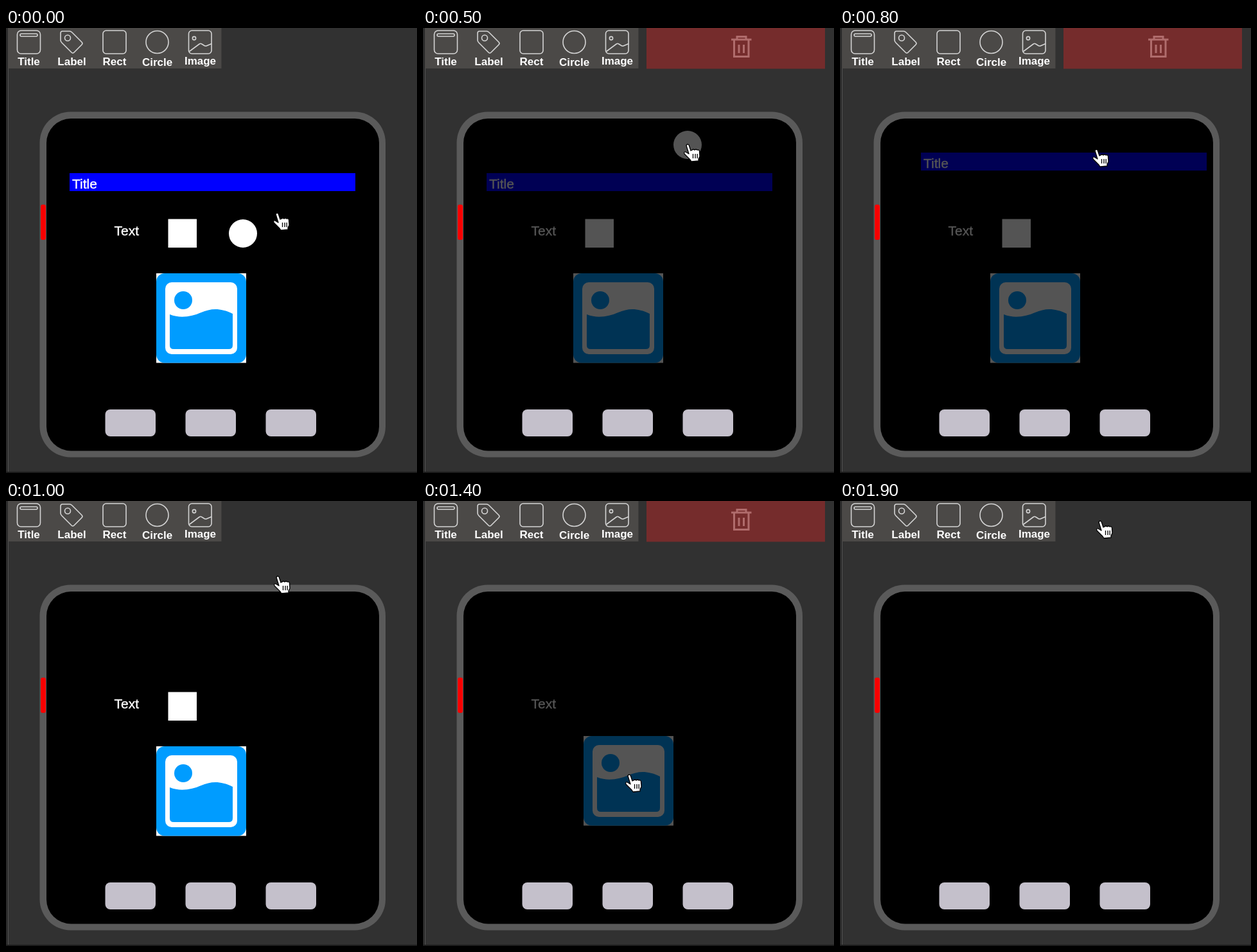
Write an HTML page that moves like this. It is 640 px wide and 693 px high and loops after 2000 ms.

```html
<!DOCTYPE html>
<html lang="en">
<head>
<meta charset="utf-8">
<title>Drag to delete</title>
<style>
html, body { margin: 0; width: 100%; height: 100%; overflow: hidden; background: #313131; }
svg { display: block; width: 100%; height: 100%; }
text { font-family: "Liberation Sans", Arial, sans-serif; fill: #fff; }
.icons { fill: none; stroke: #d4d4d4; stroke-width: 1.6; stroke-linejoin: round; }
.labels { font-size: 17px; font-weight: bold; text-anchor: middle; }
.field { font-size: 21px; stroke: #fff; stroke-width: .4; }

/* Every track holds its pose; 5% is one 100 ms step. */
.track { animation: 2s step-end infinite; }
#items { animation-name: dim; }
#trash { animation-name: bin; }
#circle { animation-name: dragCircle; }
#title { animation-name: dragTitle; }
#square { animation-name: dragSquare; }
#image { animation-name: dragImage; }
#label { animation-name: dragLabel; }
#cursor { animation-name: point; }
#hand { animation-name: hand; }
#arrow { animation-name: arrow; }

@keyframes dim {
  0%, 35%, 50%, 65%, 80%, 95%, 100% { opacity: 1; }
  25%, 40%, 60%, 70%, 90% { opacity: .33; }
}
@keyframes bin {
  0%, 35%, 50%, 65%, 80%, 95%, 100% { visibility: hidden; }
  25%, 40%, 60%, 70%, 90% { visibility: visible; }
}
@keyframes dragCircle {
  0% { transform: none; visibility: visible; }
  25% { transform: translate(43px, -138px); }
  30% { transform: translate(84px, -278px); }
  35%, 100% { visibility: hidden; }
}
@keyframes dragTitle {
  0% { transform: none; visibility: visible; }
  40% { transform: translate(27px, -32px); }
  45% { transform: translate(115px, -209px); }
  50%, 100% { visibility: hidden; }
}
@keyframes dragSquare {
  0% { transform: none; visibility: visible; }
  60% { transform: translate(203px, -296px); }
  65%, 100% { visibility: hidden; }
}
@keyframes dragImage {
  0% { transform: none; visibility: visible; }
  70% { transform: translate(16px, -16px); }
  75% { transform: translate(165px, -423px); }
  80%, 100% { visibility: hidden; }
}
@keyframes dragLabel {
  0% { transform: none; visibility: visible; }
  90% { transform: translate(214px, -276px); }
  95%, 100% { visibility: hidden; }
}
@keyframes point {
  0% { transform: translate(422px, 289px); }
  15% { transform: translate(425px, 290px); }
  20% { transform: translate(369px, 320px); }
  25% { transform: translate(412px, 182px); }
  30% { transform: translate(453px, 42px); }
  35% { transform: translate(372px, 222px); }
  40% { transform: translate(399px, 190px); }
  45% { transform: translate(487px, 6px); }
  50% { transform: translate(423px, 118px); }
  55% { transform: translate(272px, 318px); }
  60% { transform: translate(475px, 22px); }
  65% { transform: translate(305px, 443px); }
  70% { transform: translate(321px, 427px); }
  75% { transform: translate(470px, 20px); }
  80% { transform: translate(292px, 237px); }
  85% { transform: translate(186px, 312px); }
  90% { transform: translate(400px, 36px); }
  95%, 100% { transform: translate(405px, 32px); }
}
@keyframes hand {
  0%, 40%, 100% { visibility: visible; }
  35% { visibility: hidden; }
}
@keyframes arrow {
  0%, 40%, 100% { visibility: hidden; }
  35% { visibility: visible; }
}
</style>
</head>
<body>
<svg viewBox="0 0 640 693">
  <rect width="640" height="693" fill="#313131"/>
  <rect width="3" height="693" fill="#2b2b2b"/>
  <rect x="3" width="1" height="693" fill="#505050"/>
  <rect y="691" width="640" height="2" fill="#1b1b1b"/>

  <!-- device -->
  <rect x="52.5" y="130.5" width="538.5" height="538" rx="48" fill="#5a5a5a"/>
  <rect x="63" y="141" width="518" height="517.5" rx="38"/>
  <rect x="54" y="275" width="8" height="55" rx="3" fill="#f70000"/>
  <g fill="#c4c0cb">
    <rect x="154.5" y="594" width="78.5" height="42" rx="8"/>
    <rect x="279.5" y="594" width="78.5" height="42" rx="8"/>
    <rect x="404.5" y="594" width="78.5" height="42" rx="8"/>
  </g>

  <g id="items" class="track">
    <g id="title" class="track">
      <rect x="99" y="226" width="445" height="28" fill="#00f"/>
      <text class="field" x="103" y="250">Title</text>
    </g>
    <text id="label" class="field track" x="168.5" y="323">Text</text>
    <rect id="square" class="track" x="252.5" y="297.5" width="44.5" height="44.5" fill="#fff"/>
    <circle id="circle" class="track" cx="369" cy="320" r="22" fill="#fff"/>
    <g id="image" class="track" fill="#009cff">
      <rect x="234" y="382" width="140" height="139.5" fill="#fff"/>
      <rect x="234" y="382" width="140" height="139.5" rx="13"/>
      <rect x="248" y="396" width="112" height="112" rx="10" fill="#fff"/>
      <circle cx="276" cy="424" r="14"/>
      <path d="M255 446C272 453 290 449 304 443S333 435 353 445V494q0 6-6 6H261q-6 0-6-6Z"/>
    </g>
  </g>

  <!-- palette -->
  <rect x="3" width="332.5" height="63" fill="#4b4947"/>
  <g class="icons">
    <rect x="17.5" y="4" width="36" height="36" rx="6"/>
    <rect x="22" y="9" width="27" height="4" rx="2"/>
    <path d="M88 5H99q2 0 4 2L118 22q2 2 0 4L106 38q-2 2-4 0L87 23q-2-2-2-4V8q0-3 3-3Z"/>
    <circle cx="96" cy="15.5" r="4.5"/>
    <rect x="151" y="4" width="36" height="36" rx="5"/>
    <circle cx="235.5" cy="22" r="17.5"/>
    <rect x="284.5" y="4" width="35.5" height="36" rx="5"/>
    <circle cx="293" cy="16" r="2.6"/>
    <path d="M285.500 36.500L301 25q2-1.500 4 0l4 2.500q2 1 4 0l7-3"/>
  </g>
  <g class="labels">
    <text x="35.500" y="58">Title</text>
    <text x="102.500" y="58">Label</text>
    <text x="169" y="58">Rect</text>
    <text x="235.500" y="58.500">Circle</text>
    <text x="302.500" y="57">Image</text>
  </g>

  <g id="trash" class="track">
    <rect x="348" width="278" height="63.500" fill="rgba(185,41,41,.5)"/>
    <path d="M480 18H511.500M489 17V13.500H503V17M484.500 19V44.500H507V19M492 26V39M499.500 26V39" fill="none" stroke="#b06c6c" stroke-width="3"/>
  </g>

  <g id="cursor" class="track" stroke-linejoin="round">
    <g id="hand" class="track">
      <path d="M-2 1Q-1-2 2 0L5 9 7 8Q9 6 11 8 13 6 15 8 18 7 18.500 10L19 18 17 22V25L6 26 4 23-5 14Q-6 10-3 11L2 14Z" fill="#fff" stroke="#000" stroke-width="1.300"/>
      <path d="M8.500 14V21M12 14V21M15.200 14V21" stroke="#000" stroke-width="1.300"/>
    </g>
    <path id="arrow" class="track" d="M0 0V27L6 21.500 11 32 15.500 30 11 20H18Z" fill="#000" stroke="#fff" stroke-width="2"/>
  </g>
</svg>
</body>
</html>
```
